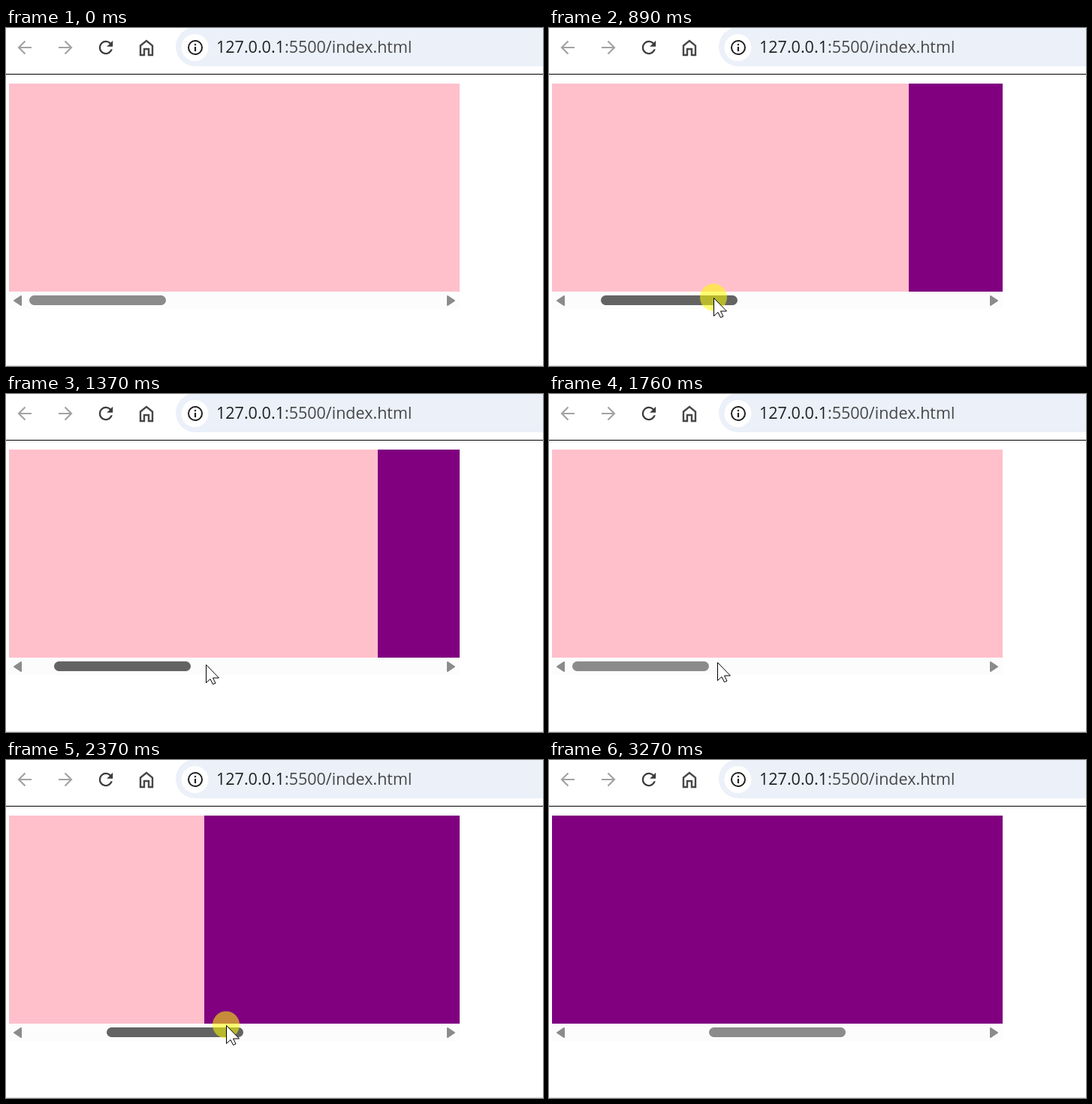
Recreate the animation shown at these times as an HTML page. Size 715 by 450 pixels, loop 3810 ms.

```html
<!DOCTYPE html>
<html lang="en">
<head>
<meta charset="utf-8">
<title>Scroll snapping</title>
<style>
  html, body { margin: 0; width: 100%; height: 100%; overflow: hidden; background: #fff; }
  svg { display: block; width: 715px; height: 450px; }
  text { font: 21.5px "Open Sans", "Noto Sans", sans-serif; }
</style>
</head>
<body>
<svg viewBox="0 0 715 450">
  <g fill="none" stroke="#a3a3a3" stroke-width="2.2">
    <path d="M34 26H18M25.5 17.5L17 26l8.5 8.5"/>
    <path d="M70 26H86M78.500 17.5L87 26l-8.500 8.5"/>
    <path stroke="#474747" stroke-width="2.400" d="M179 23.500L187 17l8 6.500V36h-5v-8h-6v8h-5z"/>
  </g>
  <path fill="#3c3c3c" transform="translate(119.200 12.200) scale(1.150)"
    d="M17.650 6.350A7.960 7.960 0 0 0 12 4a8 8 0 1 0 7.730 10h-2.080A6 6 0 1 1 12 6c1.660 0 3.140.690 4.220 1.780L13 11h7V4z"/>

  <rect x="226" y="-1" width="540" height="52" rx="26" fill="#ebf0f9"/>
  <circle cx="251.500" cy="26" r="18" fill="#fff"/>
  <circle cx="252" cy="26" r="9" fill="none" stroke="#1f1f1f" stroke-width="2"/>
  <path d="M252 25v6M252 21v2.200" stroke="#1f1f1f" stroke-width="2.200"/>
  <text x="280" y="33" fill="#1f1f1f">127.0.0.1<tspan fill="#474747">:5500/index.html</tspan></text>

  <rect y="61" width="715" height="1"/>
  <rect y="449" width="715" height="1" fill="#dedede"/>

  <rect x="4" y="74" width="600" height="277" fill="#ffc0cb"/>
  <rect id="panel" y="74" height="277" fill="#800080"/>
  <rect x="4" y="351" width="600" height="23" fill="#fcfcfc"/>
  <g fill="#8b8b8b" stroke="#8b8b8b" stroke-width="2" stroke-linejoin="round">
    <path d="M11 363l9-6v12z"/>
    <path d="M597 363l-9-6v12z"/>
  </g>
  <rect id="thumb" y="356" width="182" height="13" rx="6.500"/>

  <circle id="halo" r="18" fill="#ff0" fill-opacity=".55"/>
  <path id="cursor" d="M.5.5V24.500L6 19.500l3.500 7 3.500-1.500-3.500-7h8z" fill="#fff" stroke="#000"/>
</svg>
<script>
const LOOP = 3810, TRACK_X = 31, THUMB = 182, VIEW = 600, VIEW_RIGHT = 604;
const [panel, thumb, halo, cursor] =
  ['panel', 'thumb', 'halo', 'cursor'].map(id => document.getElementById(id));

const states = [{ time: 0, x: 578, y: 480, offset: 0, held: false, dark: false }];
const latest = () => states[states.length - 1];

const hover = (x, y) => {
  const { offset } = latest(), along = x - TRACK_X - offset;
  const dark = y >= 351 && y < 374 && along >= 0 && along <= THUMB;
  return { x, y, offset, dark, held: false };
};
const drag = (x, y) => {
  const last = latest();
  const offset = last.offset + (last.held ? x - last.x : 0);
  return { x, y, offset, dark: true, held: true };
};
// The thumb keeps its hover colour while snapping, until the pointer moves.
const snap = offset => ({ ...latest(), offset, dark: true, held: false });

// Spread the steps evenly from the first to the last time.
function play(from, to, ...steps) {
  steps.forEach(([action, ...args], i) => {
    const time = from + (to - from) * i / (steps.length - 1);
    states.push({ ...action(...args), time });
  });
}

play(70, 340, [hover, 578, 438], [hover, 485, 410], [hover, 340, 383], [hover, 205, 358], [hover, 164, 343]);
play(540, 610, [hover, 175, 350], [hover, 181, 357]);
play(750, 1030, [drag, 181, 357], [drag, 192, 358], [drag, 219, 359], [drag, 248, 360], [drag, 266, 360]);
play(1300, 1430, [snap, 75], [snap, 33], [snap, 0]);
play(1630, 2100, [hover, 254, 359], [hover, 224, 357], [hover, 198, 355], [hover, 190, 354],
  [drag, 190, 354], [drag, 207, 354], [drag, 232, 354]);
play(2170, 2510, [drag, 252, 354], [drag, 274, 354], [drag, 293, 353], [drag, 308, 352], [drag, 318, 352], [drag, 322, 352]);
play(2780, 3270, [snap, 139], [snap, 168], [snap, 182],
  [hover, 338, 360], [hover, 395, 385], [hover, 465, 414], [hover, 539, 440], [hover, 560, 480]);

function place(node, attributes) {
  for (const name in attributes) node.setAttribute(name, attributes[name]);
}

function render(time) {
  const { x, y, offset, held, dark } = states.findLast(s => s.time <= time + 0.5);
  const scroll = offset * VIEW / THUMB;
  place(panel, { x: Math.round(VIEW_RIGHT - scroll), width: Math.round(scroll) });
  place(thumb, { x: TRACK_X + offset, fill: dark ? '#636363' : '#8b8b8b' });
  place(halo, { cx: x, cy: y - 0.5, visibility: held ? 'visible' : 'hidden' });
  place(cursor, { transform: `translate(${x} ${y})` });
}

const start = performance.now();
function tick() {
  render((performance.now() - start) % LOOP);
  requestAnimationFrame(tick);
}
tick();
</script>
</body>
</html>
```
